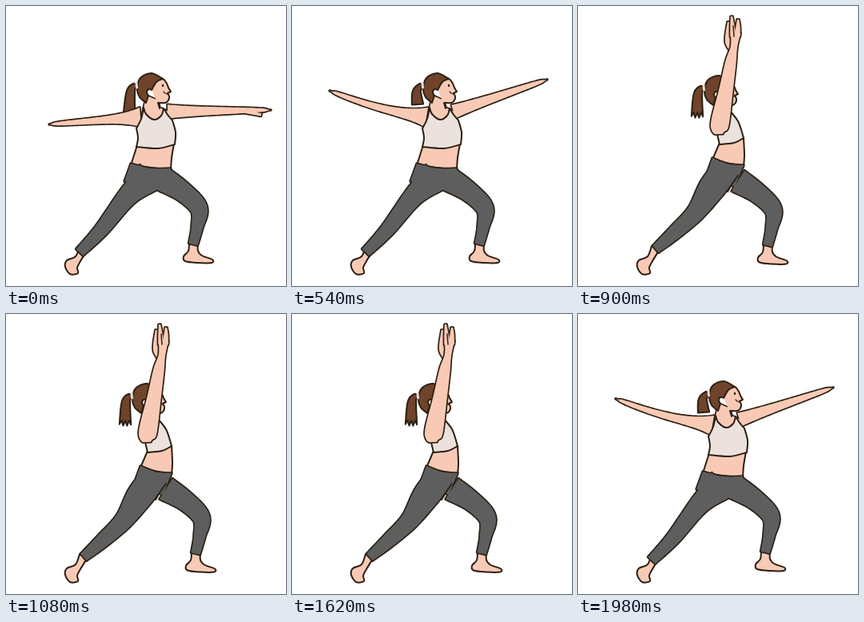
An HTML page for the animation above (2160 ms loop, 350 px wide and 350 px high).

```html
<!DOCTYPE html>
<html lang="en">
<head>
<meta charset="utf-8">
<title>Yoga stretch</title>
<style>
html, body { margin: 0; width: 100%; height: 100%; overflow: hidden; background: #fff; }
svg { display: block; width: 100vw; height: 100vh; }
path { stroke-linejoin: round; stroke-linecap: round; }
</style>
</head>
<body>
<svg id="stage" viewBox="0 0 350 350"></svg>
<script>
const STEP = 180;
const INK = '#2c2013', SKIN = '#f8cab5', HAIR = '#70432b', TOP = '#ebe2dd', PANTS = '#5e5e5e';

const path = (d, fill, width = 2, stroke = INK) =>
  `<path d="${d}" fill="${fill}" stroke="${stroke}" stroke-width="${width}"/>`;

// Several shapes sharing one outline: ink underneath, colour on top.
const union = (fill, ...ds) =>
  ds.map(d => path(d, INK, 3.4)).join('') + ds.map(d => path(d, fill, 0)).join('');

const move = (dx, dy, content) => `<g transform="translate(${dx} ${dy})">${content}</g>`;

// Smooth curve through "x,y" points; a trailing "!" makes a sharp corner.
function curve(text, closed = true) {
  const pts = text.split(' ').map(p => {
    const [x, y] = p.replace('!', '').split(',').map(Number);
    return { x, y, corner: p.endsWith('!') };
  });
  const n = pts.length;
  const at = i => pts[closed ? (i + n) % n : Math.max(0, Math.min(n - 1, i))];
  let d = `M${pts[0].x} ${pts[0].y}`;
  for (let i = 0; i < (closed ? n : n - 1); i++) {
    const a = at(i), b = at(i + 1);
    const p = a.corner ? a : at(i - 1), q = b.corner ? b : at(i + 2);
    d += `C${a.x + (b.x - p.x) / 6} ${a.y + (b.y - p.y) / 6} ` +
         `${b.x - (q.x - a.x) / 6} ${b.y - (q.y - a.y) / 6} ${b.x} ${b.y}`;
  }
  return d + (closed ? 'Z' : '');
}

// Catmull-Rom position on a chain of [x, y, radius] joints, u from 0 to 1.
function along(joints, u) {
  const last = joints.length - 1;
  const i = Math.min(last - 1, Math.floor(u * last)), t = u * last - i;
  const at = k => joints[Math.max(0, Math.min(last, k))];
  const [p, a, b, q] = [at(i - 1), at(i), at(i + 1), at(i + 2)];
  return a.map((v, k) => v + t / 2 * (b[k] - p[k] +
    t * (2 * p[k] - 5 * v + 4 * b[k] - q[k] + t * (3 * (v - b[k]) + q[k] - p[k]))));
}

// Outline of a tapered limb; a fringe gives its end a ragged edge.
function limb(joints, fringe = 0) {
  const N = 40, left = [], right = [], end = [];
  for (let i = 0; i <= N; i++) {
    const [x, y, r] = along(joints, i / N);
    const a = along(joints, Math.max(0, i / N - 0.01));
    const b = along(joints, Math.min(1, i / N + 0.01));
    const len = Math.hypot(b[0] - a[0], b[1] - a[1]);
    const ux = (b[0] - a[0]) / len, uy = (b[1] - a[1]) / len, w = Math.max(0, r - 0.8);
    left.push([x + uy * w, y - ux * w]);
    right.unshift([x - uy * w, y + ux * w]);
    if (i === N && fringe) {
      for (let k = 1; k < 6; k++) {
        const side = w * (1 - k / 3), out = k % 2 ? -fringe : fringe / 3;
        end.push([x + uy * side + ux * out, y - ux * side + uy * out]);
      }
    }
  }
  return 'M' + [...left, ...end, ...right].map(p => p.map(v => v.toFixed(2)).join(' ')).join('L') + 'Z';
}

// Shoulder to fingertip, slimming by rule, with an optional sag.
function arm(x0, y0, x1, y1, upper, bulge, sag = 0) {
  const joints = [];
  for (let i = 0; i <= 20; i++) {
    const t = i / 20;
    const r = 3 + (upper - 3) * (1 - t) + bulge * (1 - t) ** 6;
    joints.push([x0 + (x1 - x0) * t, y0 + (y1 - y0) * t + sag * Math.sin(Math.PI * t),
      r * Math.sqrt(1 - t ** 16)]);
  }
  return limb(joints);
}
const leftArm = (x, y, sag) => arm(168, 139, x, y, 6.5, 6.5, sag);
const rightArm = (x, y) => arm(202, 132, x, y, 8, 1.5);

const head =
  path(curve('180,100 186,92 196,91 201,97 203,102 206,107! 202,109! 204,113 203,118 199,121 190,121! 192,128!', false), SKIN) +
  path(curve('196,91! 188,95 182,105! 178,104 176,108 178,112! 175,121! 167,114 164,104 168,90 182,84'), HAIR) +
  path('M196 99v1', 'none', 2.3) +
  path('M197 107q2 3 5 3', 'none', 1.3) +
  path('M163 96l.5 6', 'none', 3, '#e6ddd8');

function tail([dx, dy], x, y, fringe) {
  const rx = 162 + dx, ry = 98 + dy;
  return path(limb([[rx, ry, 3], [rx - 6, ry + 9, 6], [x, y, 8]], fringe), HAIR);
}

const frontFoot = path(curve('229,294! 228,306 222,313 224,319 240,321 257,321 258,317 245,312 240,306 240,295!'), SKIN);
const backFoot = path(curve('92,300! 87,313 76,318 74,326 80,335 90,334 89,327 93,319 101,306!'), SKIN);
const frontLeg = [[197, 217, 16], [222, 233, 13], [241, 253, 11.5], [239, 276, 8], [234, 298, 6.5]];
const wideLeg = [[180, 213, 20], [152, 238, 13], [119, 280, 9.5], [92, 308, 7]];
const deepLeg = [[183, 207, 17], [167, 228, 17], [147, 258, 12], [121, 283, 9.5], [97, 304, 6.5]];

function lowerBody({ waist: [x0, y0, x1, y1], ribs: [a0, b0, a1, b1], backLeg, step }) {
  const hips = curve(`${x0},${y0}! ${(x0 + x1) / 2},${(y0 + y1) / 2 + 3} ${x1},${y1}! 196,226! ${x0 - 8},${y0 + 22}!`);
  const belly = curve(`${a0},${b0}! ${x0},${y0 + 2}! ${x1},${y1 + 2}! ${x1 + 1},${y1 - 13} ${a1},${b1}!`);
  const front = limb(frontLeg.map(([x, y, r]) => [x + step, y + step / 2, r]));
  return move(step, step / 2, frontFoot) + backFoot + path(belly, SKIN) +
    union(PANTS, hips, limb(backLeg), front);
}

const chest = curve('176,112! 190,118! 192,127! 203,132! 205,150! 168,150! 172,127!');
const openBra = path(curve('172,127! 175,135 185,142 194,137 197,128! 202,136 208,143! 212,158 211,173! 190,178 163,176! 165,165 163,153! 169,141'), TOP);
const sideBra = path(curve('187,128! 200,144 207,165! 195,171 177,173! 171,148!'), TOP);

// Facing the viewer with both arms out.
function open({ headAt = [0, 0], braAt = [0, 0], tailEnd, fringe, arms, waist, ribs }) {
  return tail(headAt, ...tailEnd, fringe) +
    lowerBody({ waist, ribs, backLeg: wideLeg, step: 0 }) +
    union(SKIN, chest, ...arms) + move(...braAt, openBra) + move(...headAt, head);
}

// In profile with the palms together overhead.
function raised() {
  const at = [-6, 3];
  const reach = limb([[177, 160, 5], [177, 149, 12], [185, 105, 9.5], [191, 70, 7.5], [195, 51, 5], [197, 33, 7]]);
  const fingers = [[192, 13], [200, 17]].map(([x, y], i) =>
    limb([[194 + i * 5, 38, 4.5], [193 + i * 7, 26, 3.5], [x, y, 2]]));
  return tail(at, 149, 138, 5) +
    lowerBody({ waist: [168, 190, 207, 199], ribs: [177, 171, 207, 165], backLeg: deepLeg, step: 3 }) +
    path('M200 212Q193 221 187 232', 'none') +
    move(...at, head) + sideBra +
    union(SKIN, limb([[192, 54, 4], [188, 43, 5], [189, 20, 3]])) +
    union(SKIN, reach, ...fingers) + path('M194 25l1 13', 'none', 1.5);
}

const wide = { waist: [156, 197, 206, 203], ribs: [164, 174, 210, 172] };
const poses = [
  open({ ...wide, tailEnd: [154, 134], arms: [leftArm(54, 148, 0), rightArm(331, 130), limb([[300, 132, 3], [319, 136, 2.5]])] }),
  open({ ...wide, tailEnd: [157, 123], arms: [leftArm(47, 106, 4), rightArm(319, 92)] }),
  open({
    headAt: [-3, 0], braAt: [1, -3], tailEnd: [147, 143], fringe: 5,
    waist: [160, 194, 206, 200], ribs: [165, 171, 211, 169],
    arms: [leftArm(81, 38, 4), rightArm(266, 48), limb([[92, 58, 4], [100, 46, 2.5]])]
  }),
  raised()
];
const order = [0, 0, 0, 1, 2, 3, 3, 3, 3, 3, 2, 1];

const stage = document.getElementById('stage');
stage.innerHTML = poses.map(p => `<g>${p}</g>`).join('');
const groups = [...stage.children];
const start = performance.now();

function update(ms) {
  const current = order[Math.floor(ms / STEP) % order.length];
  groups.forEach((g, i) => g.setAttribute('visibility', i === current ? 'visible' : 'hidden'));
}

function tick() {
  update(performance.now() - start);
  requestAnimationFrame(tick);
}
tick();
</script>
</body>
</html>
```
